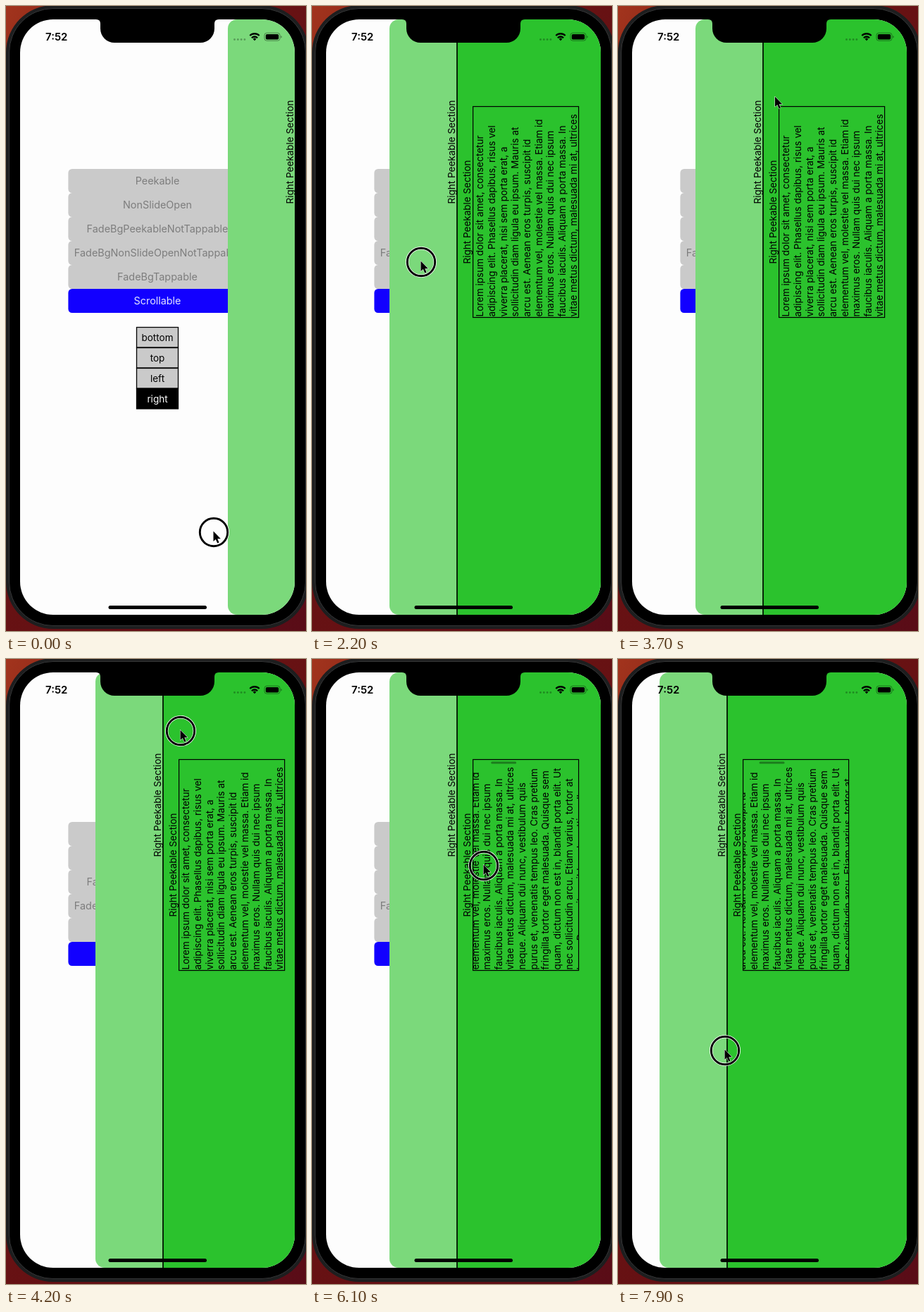
Animation of 426x886 px, one loop 8000 ms. Source, as an HTML page:

```html
<!DOCTYPE html>
<html lang="en">
<head>
<meta charset="utf-8">
<title>Peekable sections</title>
<style>
  html, body { margin: 0; width: 100%; height: 100%; overflow: hidden; background: #000; }
  svg { display: block; width: 426px; height: 886px; }
  text { font: 13.5px Inter, "Open Sans", sans-serif; white-space: pre; }
  .mid { text-anchor: middle; }
  .option { font-size: 14.4px; }
  .clock { font-size: 15px; font-weight: 600; }
</style>
</head>
<body>
<svg viewBox="0 0 426 886">
  <defs>
    <linearGradient id="wall" x2="1" y2="1">
      <stop offset="0" stop-color="#a2341d"/>
      <stop offset=".35" stop-color="#6b1312"/>
      <stop offset="1" stop-color="#590c17"/>
    </linearGradient>
    <clipPath id="screenClip"><rect x="20" y="19" width="390" height="844" rx="47"/></clipPath>
    <clipPath id="boxClip"><rect x="118.6" y="142" width="150" height="300"/></clipPath>
  </defs>

  <rect width="426" height="886" fill="url(#wall)"/>
  <rect x="0" y="-1" width="430" height="884" rx="67" fill="#1d1e1f"/>
  <rect x="4.5" y="3.5" width="421" height="875" rx="62.5" stroke="#363738"/>

  <g clip-path="url(#screenClip)">
    <rect x="20" y="19" width="390" height="844" fill="#fdfdfd"/>
    <g id="page"></g>
    <g id="panel">
      <rect y="19" width="600" height="844" rx="13" fill="#7bd97b"/>
      <rect x="95" y="19" width="505" height="844" fill="#2bc22d"/>
      <rect x="95.2" y="19" width="1.6" height="844"/>
      <text class="mid" transform="translate(93 207) rotate(-90)">Right Peekable Section</text>
      <text class="mid" transform="translate(115 292) rotate(-90)">Right Peekable Section</text>
      <g clip-path="url(#boxClip)">
        <g id="story"></g>
        <rect id="bar" y="145.5" width="36" height="3" rx="1.5" opacity=".36"/>
      </g>
      <rect x="118.6" y="142.5" width="150" height="299" fill="none" stroke="#000" stroke-width="1.2"/>
    </g>

    <path d="M128 18v1q6 0 6 6v7a20 20 0 0 0 20 20h122a20 20 0 0 0 20-20v-7q0-6 6-6v-1z"/>
    <text class="clock" x="56" y="49">7:52</text>
    <g id="dots" opacity=".28"></g>
    <g fill="none" stroke="#000" stroke-width="2.3">
      <path d="M346.3 42a9.5 9.5 0 0 1 13.4 0"/>
      <path d="M348.9 45.2a5.8 5.8 0 0 1 8.2 0"/>
    </g>
    <path d="M353 49.2l-2.3-2.5a3.3 3.3 0 0 1 4.6 0z"/>
    <rect x="367" y="38.2" width="22" height="11" rx="3.3" fill="none" stroke="#000" opacity=".4"/>
    <rect x="368.8" y="40" width="18.4" height="7.4" rx="1.7"/>
    <path d="M390.4 42v3.6q1.3-.6 1.3-1.8t-1.3-1.8z" opacity=".45"/>
    <rect x="145.5" y="850" width="139.5" height="5" rx="2.5"/>
  </g>

  <g id="pointer">
    <g id="ring" fill="none">
      <circle r="19.8" stroke="#fff" stroke-width="4.4"/>
      <circle r="19.7" stroke="#000" stroke-width="2.9"/>
    </g>
    <path d="M-.5-1.5v14.6l3.3-3.1 2.4 5.4 2.4-1-2.3-5.2h4.6z" stroke="#fff" stroke-width="1" stroke-linejoin="round" paint-order="stroke"/>
  </g>
</svg>

<script>
const LOOP = 8000, STEP = 100, LINE = 16.65;
const CLOSED = 315, OPEN = 110, SETTLE = 300;
const $ = id => document.getElementById(id);

function add(parent, tag, attrs, text) {
  const el = document.createElementNS("http://www.w3.org/2000/svg", tag);
  for (const name in attrs) el.setAttribute(name, attrs[name]);
  if (text) el.textContent = text;
  return parent.appendChild(el);
}

const options = ["Peekable", "NonSlideOpen", "FadeBgPeekableNotTappable",
  "FadeBgNonSlideOpenNotTappable", "FadeBgTappable", "Scrollable"];
options.forEach((label, i) => {
  const on = label === "Scrollable", y = 231 + i * 34;
  add($("page"), "rect", { x: 88.4, y, width: 253.2, height: 34, rx: 5.5, fill: on ? "#1200ff" : "#cacaca" });
  add($("page"), "text", { class: "mid option", x: 215, y: y + 22.2, fill: on ? "#e4e4ff" : "#7d7d7d" }, label);
});

["bottom", "top", "left", "right"].forEach((label, i) => {
  const on = label === "right", y = 455.5 + i * 29;
  add($("page"), "rect", { x: 185.5, y, width: 59, height: 28.5, fill: on ? "#000" : "#cacaca", stroke: "#000", "stroke-width": 1.3 });
  add($("page"), "text", { class: "mid", x: 215, y: y + 19, fill: on ? "#fff" : "#000" }, label);
});

const lines = [
  "Lorem ipsum dolor sit amet, consectetur",
  "adipiscing elit. Phasellus dapibus, risus vel",
  "viverra placerat, nisi sem porta erat, a",
  "sollicitudin diam ligula eu ipsum. Mauris at",
  "arcu est. Aenean eros turpis, suscipit id",
  "elementum vel, molestie vel massa. Etiam id",
  "maximus eros. Nullam quis dui nec ipsum",
  "faucibus iaculis. Aliquam a porta massa. In",
  "vitae metus dictum, malesuada mi at, ultrices",
  "neque. Aliquam dui nunc, vestibulum quis",
  "purus et, venenatis tempus leo. Cras pretium",
  "fringilla tortor eget malesuada. Quisque sem",
  "quam, dictum non est in, blandit porta elit. Ut",
  "nec sollicitudin arcu. Etiam varius, tortor at",
  "lacus. Donec vitae nibh sed, mattis nulla"
];
lines.forEach((line, i) => add($("story"), "text", { y: i * LINE }, line));

for (let i = 0; i < 4; i++) add($("dots"), "circle", { cx: 324.5 + i * 4.8, cy: 47.5, r: 1.4 });

// Everything that moves follows from these touches
const touch = (moves, down, up, x, y, dx = 0, dy = 0) => ({ moves, down, up, x, y, dx, dy });
const touches = [
  touch("none", -100, 300, 295, 746),
  touch("panel", 800, 1500, 352, 450, CLOSED * -1 + OPEN, -70),
  touch("none", 2100, 2300, 155, 363),
  touch("panel", 2500, 2900, 187.5, 360, -29.5, 11),
  touch("panel", 3900, 4200, 231, 102, 17),
  touch("scroll", 5000, 5500, 286, 252, -45, 20),
  touch("scroll", 5700, 6100, 289, 280, -45, 13),
  touch("scroll", 6500, 6900, 244, 293, 12),
  touch("panel", 7400, 7900, 203, 550, -51, 5)
];

const mix = (a, b, p) => a + (b - a) * p;
function ease(t, from, to) {
  const p = Math.min(1, Math.max(0, (t - from) / (to - from)));
  return p * p * (3 - 2 * p);
}

function pose(t) {
  const s = { x: 0, y: 0, left: CLOSED, scroll: 0, pressed: false, scrolled: false };
  let rest = CLOSED;
  touches.forEach((g, i) => {
    if (t < g.down) return;
    const p = ease(t, g.down, g.up), next = touches[i + 1];
    s.pressed = t > g.down && t <= g.up;
    s.x = g.x + g.dx * p;
    s.y = g.y + g.dy * p;
    if (next) {
      const glide = ease(t, g.up, next.down);
      s.x = mix(s.x, next.x, glide);
      s.y = mix(s.y, next.y, glide);
    }
    if (g.moves === "panel") {
      s.left = mix(rest + g.dx * p, OPEN, ease(t, g.up, g.up + SETTLE));
      rest = OPEN;
    }
    if (g.moves === "scroll") {
      s.scroll -= g.dx * p;
      s.scrolled = s.scroll > 0;
    }
  });
  return s;
}

function draw(t) {
  const s = pose(t);
  $("pointer").setAttribute("transform", `translate(${s.x} ${s.y})`);
  $("ring").style.display = s.pressed ? "" : "none";
  $("panel").setAttribute("transform", `translate(${s.left} 0)`);
  $("story").setAttribute("transform", `translate(${133.3 - s.scroll} 440.5) rotate(-90)`);
  $("bar").setAttribute("x", 124.4 + s.scroll * .22);
  $("bar").style.display = s.scrolled ? "" : "none";
}

const start = performance.now();
function tick() {
  const t = Math.max(0, performance.now() - start) % LOOP;
  draw(Math.floor(t / STEP) * STEP);
  requestAnimationFrame(tick);
}
draw(0);
requestAnimationFrame(tick);
</script>
</body>
</html>
```
